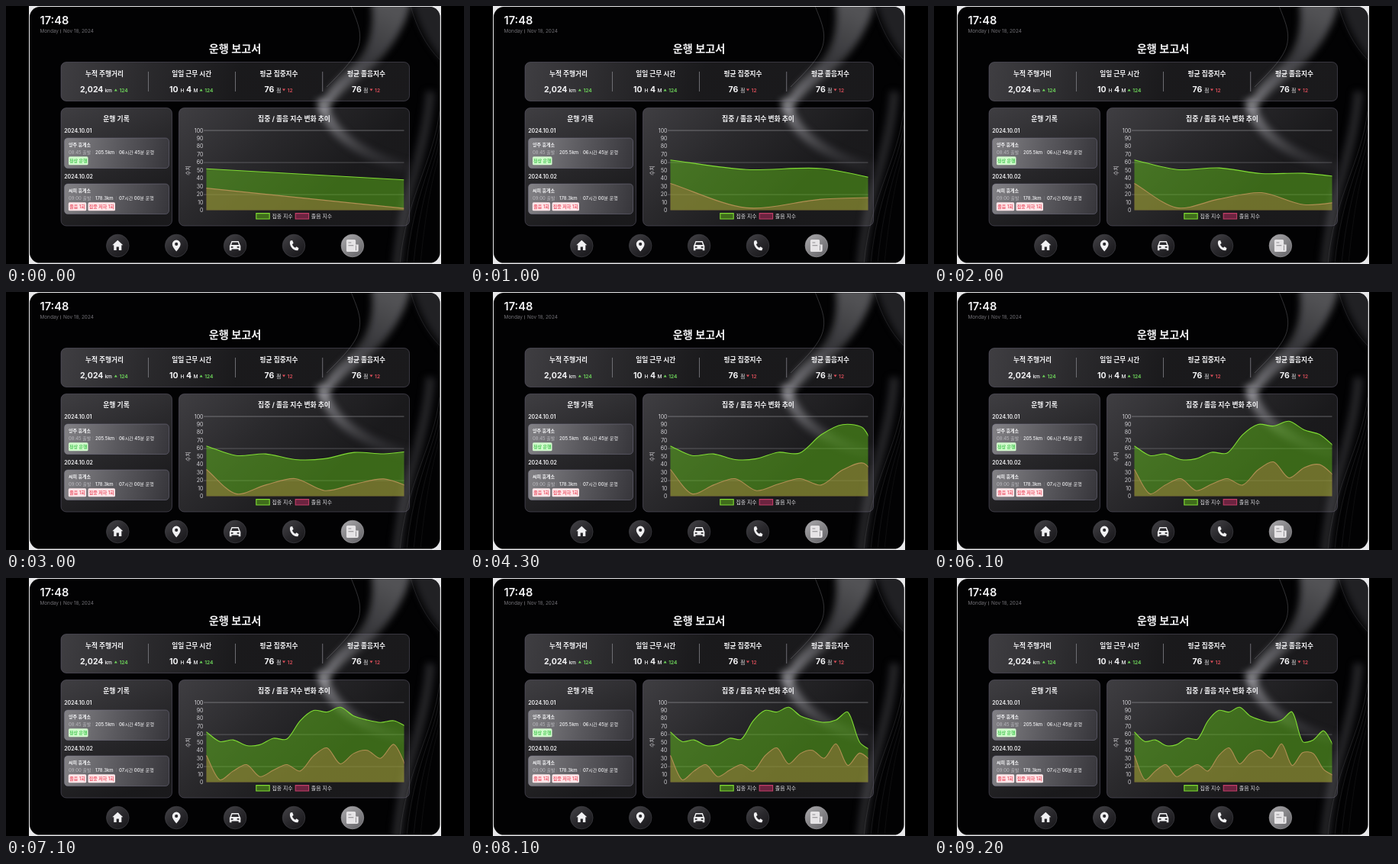
These frames come from a looping animation (600 by 338 pixels, 9300 ms). An HTML page with a canvas:

```html
<!DOCTYPE html>
<html lang="ko">
<head>
<meta charset="utf-8">
<title>운행 보고서</title>
<style>
html, body { margin: 0; width: 100%; height: 100%; overflow: hidden; background: #000; }
canvas { display: block; width: 600px; height: 338px; }
</style>
</head>
<body>
<canvas id="stage"></canvas>
<script>
const canvas = document.getElementById('stage');
const g = canvas.getContext('2d');
const dpr = window.devicePixelRatio || 1;
canvas.width = 600 * dpr;
canvas.height = 338 * dpr;

const LOOP = 9300;
const FONT = 'Inter, "Noto Sans CJK KR", "Noto Sans CJK", "Noto Sans", sans-serif';
const WHITE = '#f4f4f6', GREEN = '#70dc5c', RED = '#e2505c';
const PLOT = { left: 262.5, right: 521.5, top: 163, bottom: 267.5 };
const WIDTH = PLOT.right - PLOT.left;
const FOCUS = [63, 51, 53, 46, 47, 55, 54, 77, 90, 88, 94, 83, 78, 75, 78, 88, 51, 53, 65, 54];
const DROWSY = [33.5, 3, 14, 22, 7, 15, 22, 14, 33, 43, 23, 36, 40, 30, 48, 21, 37, 36, 16, 10];

const lerp = (a, b, p) => a + (b - a) * p;
const yOf = v => lerp(PLOT.bottom, PLOT.top, v / 100);

function text(str, x, y, size, weight = 400, color = WHITE, align = 'left') {
  g.font = `${weight} ${size}px ${FONT}`;
  g.textAlign = align;
  g.fillStyle = color;
  g.fillText(str, x, y);
}

function box(x, y, w, h, r, fill, stroke, line = 0.8) {
  g.beginPath();
  g.roundRect(x, y, w, h, r);
  g.fillStyle = fill;
  g.fill();
  if (stroke) {
    g.strokeStyle = stroke;
    g.lineWidth = line;
    g.stroke();
  }
}

function gradient(x0, y0, x1, y1, ...colors) {
  const grad = g.createLinearGradient(x0, y0, x1, y1);
  colors.forEach((c, i) => grad.addColorStop(i / (colors.length - 1), c));
  return grad;
}

function fillPath(d, fill) {
  g.fillStyle = fill;
  g.fill(new Path2D(d), 'evenodd');
}

function strokePath(d, color, width) {
  g.strokeStyle = color;
  g.lineWidth = width;
  g.stroke(new Path2D(d));
}

function blurred(radius, paint) {
  g.filter = `blur(${radius * dpr}px)`;
  paint();
  g.filter = 'none';
}

function drawBackdrop() {
  g.fillStyle = '#000';
  g.fillRect(0, 0, 600, 338);
  g.fillStyle = '#e8e8ea';
  g.fillRect(30, 0, 540, 338);
  g.save();
  box(31, 1, 537.5, 335.6, 13.5, '#020203');
  g.clip();
  // Silky folds on the right
  blurred(5, () => {
    fillPath('M478 -10H532C522 35 498 66 466 92C444 108 430 122 416 142C408 128 424 104 448 84C474 62 484 34 478 -10Z',
      gradient(490, 0, 415, 135, 'rgba(110,110,114,.75)', 'rgba(88,88,92,.6)', 'rgba(150,150,154,.75)'));
    strokePath('M413 122C420 160 452 192 528 212',
      gradient(413, 122, 528, 212, 'rgba(165,165,170,.75)', 'rgba(85,85,90,.5)', 'rgba(40,40,44,.2)'), 13);
    fillPath('M530 -10C540 25 555 55 580 80V-10Z', 'rgba(42,42,46,.8)');
    strokePath('M556 112C550 195 520 240 512 345', 'rgba(62,62,67,.6)', 12);
  });
  strokePath('M452 0C459 18 466 32 463 48C460 66 442 84 420 106', 'rgba(125,125,130,.55)', 0.7);
  for (let i = 0; i < 4; i++) {
    const x = i * 9;
    strokePath(`M568 ${138 + x * 2}C${560 + x / 6} 205 ${524 + x} 250 ${516 + x} 338`,
      `rgba(120,120,126,${0.32 - i * 0.06})`, 0.7);
  }
  strokePath('M530 0C538 28 550 52 568 70', 'rgba(95,95,100,.4)', 0.7);
  g.restore();
}

function panel(x, y, w, h) {
  box(x, y, w, h, 7,
    gradient(x, y, x + w * 0.5, y + h, 'rgba(238,234,246,.26)', 'rgba(238,234,246,.17)', 'rgba(238,234,246,.1)'),
    'rgba(112,108,128,.55)');
}

function delta(x, y, up, label) {
  const color = up ? GREEN : RED;
  const tip = up ? -3.6 : -0.4, base = up ? -0.4 : -3.6;
  fillPath(`M${x} ${y + base}h4L${x + 2} ${y + tip}Z`, color);
  text(label, x + 6.6, y + 0.6, 6.6, 600, color);
}

function drawStats() {
  panel(72, 73.5, 456.5, 51);
  ['누적 주행거리', '일일 근무 시간', '평균 집중지수', '평균 졸음지수']
    .forEach((label, i) => text(label, 129 + i * 114.3, 92, 8.7, 700, WHITE, 'center'));
  g.fillStyle = '#77767c';
  [186, 300, 414.3].forEach(x => g.fillRect(x, 86, 0.9, 26));
  const value = (str, x) => text(str, x, 113, 10.5, 700);
  const unit = (str, x) => text(str, x, 112.6, 6.6, 500);
  value('2,024', 97); unit('km', 129.4); delta(141.8, 112, true, '124');
  value('10', 214); unit('H', 228.5); value('4', 236); unit('M', 245.4);
  delta(253.6, 112, true, '124');
  value('76', 338.5); unit('점', 354.2); delta(362, 112, false, '12');
  value('76', 453); unit('점', 468.2); delta(476.5, 112, false, '12');
}

function tag(x, y, w, label, fill, color) {
  box(x, y, w, 11, 1.6, fill);
  text(label, x + w / 2, y + 7.8, 6, 600, color, 'center');
}

function trip(y, date, place, start, distance, duration) {
  text(date, 76.2, y - 7, 7, 600);
  box(76.5, y, 137, 39.5, 4.5,
    gradient(76, y + 8, 212, y + 34, '#828185', '#5b5a5f', '#38373c'), 'rgba(130,126,150,.55)');
  text(place, 82, y + 11, 6, 700);
  text(start, 82, y + 20.7, 6, 400, '#bab9be');
  text(distance, 117, y + 20.7, 6, 500);
  text(duration, 148, y + 20.7, 6, 500);
  g.fillStyle = 'rgba(150,149,154,.5)';
  [113.6, 144].forEach(x => g.fillRect(x, y + 16, 0.5, 5));
}

function drawRecords() {
  panel(72, 133.5, 145.5, 154.5);
  text('운행 기록', 144.5, 151, 8.8, 700, WHITE, 'center');
  trip(173, '2024.10.01', '양주 휴게소', '08:45 출발', '205.5km', '06시간 45분 운행');
  tag(82, 197.3, 25.5, '정상 운행', '#d2fbcd', '#4cc857');
  trip(233, '2024.10.02', '씨피 휴게소', '09:00 출발', '178.3km', '07시간 00분 운행');
  tag(81.8, 257.3, 23.4, '졸음 1회', '#ffe6e9', '#ec5f70');
  tag(107.5, 257.3, 35.5, '집중 저하 1회', '#ffe6e9', '#ec5f70');
}

// Each push rescales the x axis; points ease toward their new places.
const pushTime = k => -290 + 500 * k + 0.025 * k ** 3;
const easeOutQuart = p => 1 - (1 - Math.min(1, p)) ** 4;

function pointsAt(t, values) {
  const pts = [{ x: PLOT.left, y: yOf(values[0] * 0.31) }];
  for (let n = 1; n < values.length && pushTime(n - 1) <= t; n++) {
    const start = pushTime(n - 1);
    const p = easeOutQuart((Math.min(t, pushTime(n)) - start) / 1000);
    pts.push({ x: PLOT.left + n * WIDTH / Math.max(1, n - 1), y: PLOT.bottom });
    pts.forEach((pt, i) => {
      pt.x = lerp(pt.x, PLOT.left + i * WIDTH / n, p);
      pt.y = lerp(pt.y, yOf(values[i]), p);
    });
  }
  return pts;
}

function handles(prev, cur, next, tension = 0.3) {
  const a = Math.hypot(cur.x - prev.x, cur.y - prev.y);
  const b = Math.hypot(next.x - cur.x, next.y - cur.y);
  const before = tension * a / (a + b || 1), after = tension * b / (a + b || 1);
  const dx = next.x - prev.x, dy = next.y - prev.y;
  return {
    inX: cur.x - before * dx, inY: cur.y - before * dy,
    outX: cur.x + after * dx, outY: cur.y + after * dy
  };
}

function drawSeries(pts, fill, line) {
  const hs = pts.map((pt, i) => handles(pts[i - 1] || pt, pt, pts[i + 1] || pt));
  const curve = new Path2D();
  curve.moveTo(pts[0].x, pts[0].y);
  for (let i = 1; i < pts.length; i++) {
    const a = hs[i - 1], b = hs[i];
    curve.bezierCurveTo(a.outX, a.outY, b.inX, b.inY, pts[i].x, pts[i].y);
  }
  const area = new Path2D(curve);
  area.lineTo(pts[pts.length - 1].x, PLOT.bottom);
  area.lineTo(PLOT.left, PLOT.bottom);
  g.fillStyle = fill;
  g.fill(area);
  g.strokeStyle = line;
  g.lineWidth = 1.1;
  g.stroke(curve);
}

function drawChart(t) {
  panel(226.5, 133.5, 302, 154.5);
  text('집중 / 졸음 지수 변화 추이', 377.5, 151, 8.8, 700, WHITE, 'center');
  for (let v = 0; v <= 100; v += 10) {
    text(v, 258.5, yOf(v) + 2.5, 7, 400, '#d2d1d5', 'right');
  }
  g.save();
  g.translate(241, 215.5);
  g.rotate(-Math.PI / 2);
  text('수치', 0, 0, 7, 400, '#d2d1d5', 'center');
  g.restore();
  [100, 60, 20].forEach(v => {
    g.fillStyle = `rgba(205,205,210,${v === 100 ? 0.45 : 0.32})`;
    g.fillRect(259, Math.round(yOf(v)) - 0.4, PLOT.right - 259, 0.9);
  });

  g.save();
  g.beginPath();
  g.rect(PLOT.left - 0.6, PLOT.top - 1, WIDTH + 0.6, PLOT.bottom - PLOT.top + 1.6);
  g.clip();
  drawSeries(pointsAt(t, DROWSY), 'rgba(255,62,112,.4)', '#ee6084');
  drawSeries(pointsAt(t, FOCUS), 'rgba(100,200,24,.45)', '#80dc34');
  g.restore();

  box(327.8, 271.6, 17.4, 7.4, 0, '#3f6c1b', '#80dc34', 1.1);
  text('집중 지수', 348.4, 278, 6.9, 400, '#e2e1e5');
  box(379.2, 271.6, 17.4, 7.4, 0, '#6c2440', '#c33f68', 1.1);
  text('졸음 지수', 399.8, 278, 6.9, 400, '#e2e1e5');
}

const ICONS = [
  'M0-7.2L7-.8H5V6H1.6V1.6H-1.6V6H-5V-.8H-7Z',
  'M0 7.5C-3 3.8-5.4 1.2-5.4-2A5.4 5.4 0 0 1 5.4-2C5.4 1.2 3 3.8 0 7.5ZM0-4.2A2.1 2.1 0 1 0 0 0A2.1 2.1 0 1 0 0-4.2Z',
  'M-4.6-6H4.6L6.6-.8L7.2 0V6.2H4.6V4.4H-4.6V6.2H-7.2V0L-6.6-.8ZM-3.7-4.4L-4.9-.9H4.9L3.7-4.4ZM-5.4 1V2.8H-2.6V1ZM2.6 1V2.8H5.4V1Z',
  'M-4.5-6.6L-1.9-6.9L-.4-3.2L-2.1-1.8C-1.2.4.1 1.8 2 2.7L3.5 1.2L6.5 3.3L5.4 6.2C-.9 7.4-7.2-1.3-4.5-6.6Z',
  'M-6.4-8H2.6Q4.2-8 4.2-6.4V-1.6H7.8V6.2Q7.8 8 6 8H-6.4Q-8 8-8 6.4V-6.4Q-8-8-6.4-8ZM-5.4-4.6V-3.6H-1.6V-4.6ZM-5.4-.8V.2H1.4V-.8ZM4.2-.4V6.2H5V-.4Z'
];

function drawNav() {
  ICONS.forEach((icon, i) => {
    const active = i === 4;
    g.save();
    g.translate(146.3 + i * 76.9, 314);
    g.beginPath();
    g.arc(0, 0, 14.8, 0, Math.PI * 2);
    g.fillStyle = active
      ? gradient(-10, -12, 10, 13, '#a3a2a5', '#858487', '#69686c')
      : gradient(-10, -12, 10, 13, '#3f3e42', '#29282c', '#1a191c');
    g.fill();
    g.strokeStyle = active ? '#9b9a9e' : '#403f45';
    g.lineWidth = 0.7;
    g.stroke();
    fillPath(icon, active ? '#e6e4e6' : '#f1f1f3');
    g.restore();
  });
}

function draw(t) {
  g.setTransform(dpr, 0, 0, dpr, 0, 0);
  drawBackdrop();
  text('17:48', 44.5, 24.3, 14.6, 600);
  text('Monday', 44.5, 35.4, 6.4, 400, '#747378');
  g.fillStyle = '#747378';
  g.fillRect(71, 30.6, 0.7, 5);
  text('Nov 18, 2024', 75, 35.4, 6.4, 400, '#747378');
  text('운행 보고서', 300, 61, 14.2, 700, WHITE, 'center');
  drawStats();
  drawRecords();
  drawChart(t);
  drawNav();
}

const began = performance.now();
function tick() {
  const elapsed = (performance.now() - began) % LOOP;
  draw(Math.floor(elapsed / 100) * 100);
  requestAnimationFrame(tick);
}
tick();
</script>
</body>
</html>
```
